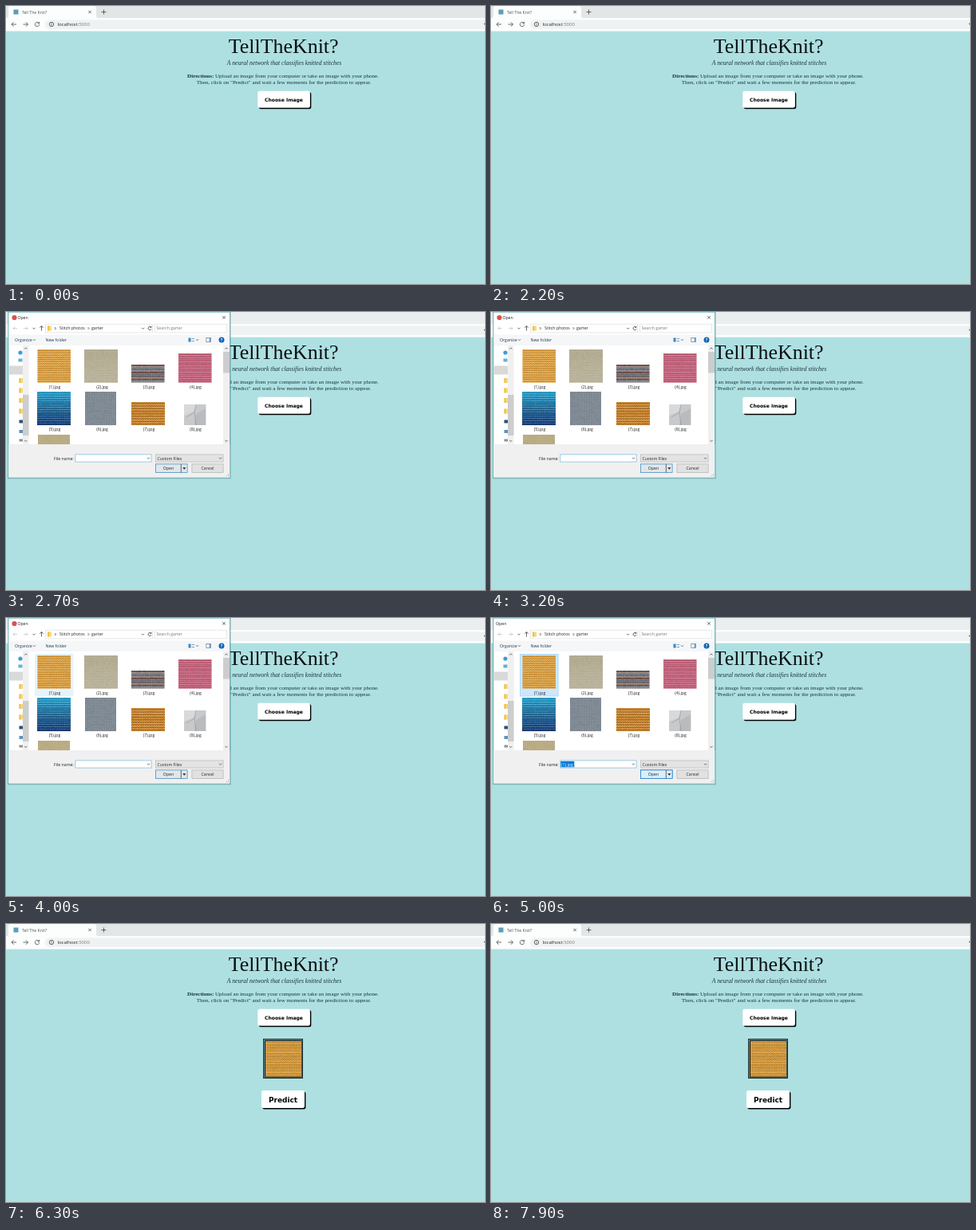
Write an HTML page that moves like this. It is 600 px wide and 349 px high and loops after 8000 ms.

```html
<!DOCTYPE html>
<html lang="en">
<head>
<meta charset="utf-8">
<title>Tell The Knit?</title>
<style>
html, body { margin: 0; width: 100%; height: 100%; overflow: hidden; background: #aee0e2; }
svg { display: block; width: 600px; height: 349px; }
text { font-family: "Open Sans", "Noto Sans", sans-serif; font-size: 5.2px; fill: #222; white-space: pre; }
.serif { font-family: "Liberation Serif", "Noto Serif", serif; font-size: 7.06px; fill: #1a3236; }
.btn { font-family: "DejaVu Sans", sans-serif; font-weight: bold; fill: #000; }
.mid { text-anchor: middle; }
.line { fill: none; stroke: #444; stroke-width: .8; }
</style>
</head>
<body>
<svg id="stage" viewBox="0 0 600 349"></svg>
<script>
const LOOP = 8000;
const stage = document.getElementById('stage');

let seed = 7;
const rand = () => (seed = (seed * 16807) % 2147483647) / 2147483647;

const rect = (x, y, w, h, fill, more = '') =>
  `<rect x="${x}" y="${y}" width="${w}" height="${h}" fill="${fill}" ${more}/>`;
const box = (x, y, w, h, fill, stroke) =>
  rect(x + .4, y + .4, w - .8, h - .8, fill, `stroke="${stroke}" stroke-width=".7"`);
const text = (x, y, s, more = '') => `<text x="${x}" y="${y}" ${more}>${s}</text>`;
const line = (d, more = '') => `<path class="line" d="${d}" ${more}/>`;
const circle = (x, y, r, fill) => `<circle cx="${x}" cy="${y}" r="${r}" fill="${fill}"/>`;
// A group seen only between two times
const timed = (from, to, body) => `<g data-from="${from}" data-to="${to}">${body}</g>`;

// Knitted rows: base colour, dark loops, light glints
function swatch(x, y, w, h, colour, { gap = 2.8, dark = .3, light = .3 } = {}) {
  const n = Math.round(h / gap), p = h / n, step = w / Math.round(w / 3);
  let out = '';
  for (let i = 0; i < n; i++) {
    const top = y + i * p;
    let loops = '', glints = '';
    for (let cx = x; cx < x + w - .1; cx += step) {
      const lift = (rand() - .5) * .5;
      loops += `M${cx.toFixed(2)} ${(top + p * .75).toFixed(2)}q${step / 2} ${(-p * .7 + lift).toFixed(2)} ${step} 0`;
      if (rand() < .65) glints += `M${(cx + step * .25).toFixed(2)} ${(top + p * .2).toFixed(2)}h${(step * .5).toFixed(2)}`;
    }
    out += rect(x, top, w, p + .1, colour(i / (n - 1), i)) +
      `<path d="${loops}" fill="none" stroke="#201000" stroke-opacity="${dark}" stroke-width=".85"/>` +
      `<path d="${glints}" stroke="#fff" stroke-opacity="${light}" stroke-width=".7"/>`;
  }
  return out;
}
const plain = c => () => c;
const blend = (a, b) => k => `rgb(${a.map((v, i) => Math.round(v + (b[i] - v) * k))})`;
const cycle = list => (k, i) => list[i % list.length];
const gold = plain('#e6a743');

function browser() {
  return rect(0, 0, 600, 15, '#e2e6e6') +
    timed(2300, 5300, rect(0, 0, 600, 15, '#eaeeee')) +
    '<path d="M1 15q2 0 2-3V3q0-3 3-3H110q3 0 3 3v9q0 3 2 3z" fill="#fcfdfd"/>' +
    rect(9.5, 4.5, 6, 6, '#5a9db8') +
    text(20, 9.5, 'Tell The Knit?', 'style="font-size:5.15px;fill:#555"') +
    line('M103.3 5.8l3.4 3.4m0-3.4l-3.4 3.4') +
    line('M119.5 7.5h6m-3-3v6') +
    rect(0, 15, 600, 17, '#fcfdfd') +
    rect(49, 17.5, 570, 11.5, '#eff2f2', 'rx="5.7"') +
    line('M13 23h-6m2.6-2.7L7 23l2.6 2.7M21.5 23h6m-2.6-2.7l2.6 2.7-2.6 2.7', 'stroke-width="1"') +
    line('M41 21.2a2.7 2.7 0 1 0 .7 2.2M41.7 19.8v2.2h-2.3') +
    line('M54.3 23a2.7 2.7 0 1 0 5.4 0a2.7 2.7 0 1 0-5.4 0M57 22.6v1.8M57 21.2v.6') +
    text(64.4, 25.3, 'localhost<tspan fill="#777c80">:5000</tspan>', 'style="font-size:6px"') +
    line('M600 22l-1.2.4 1.2.8', 'stroke-width=".5"');
}

const button = (x, y, w, h) =>
  rect(x + 1.4, y + 1.4, w, h, '#000', 'rx="2.2"') + rect(x, y, w, h, '#fff', 'rx="2.2"');

function page() {
  return rect(0, 31.6, 600, 318, '#aee0e2') +
    text(347.7, 59.2, 'TellTheKnit?', 'class="serif mid" style="font-size:25.9px;fill:#0b0f10"') +
    text(348.5, 74, 'A neural network that classifies knitted stitches',
      'class="serif mid" style="font-size:7.6px;font-style:italic"') +
    text(347, 89.6, '<tspan font-weight="bold">Directions:</tspan> Upload an image from your computer or take an image with your phone.',
      'class="serif mid"') +
    text(348, 97.6, 'Then, click on "Predict" and wait a few moments for the prediction to appear.', 'class="serif mid"') +
    button(315.3, 106.8, 65.6, 21) +
    text(348, 120, 'Choose Image', 'class="btn mid" style="font-size:6.06px"') +
    timed(5400, LOOP,
      rect(322, 144, 50, 50, '#1c2c30') + rect(323, 145, 48, 48, '#6d9499') +
      rect(324, 146, 46.5, 46.5, '#10181a') + swatch(325, 147, 45, 44.5, gold) +
      button(320, 209, 54, 22) +
      text(347, 224, 'Predict', 'class="btn mid" style="font-size:8.95px"'));
}

const scrollBar = (x, w, top, thumbY, thumbH) => {
  const c = x + w / 2;
  return rect(x, top, w, 166 - top, '#f0f0f0') + rect(x, thumbY, w, thumbH, '#cdcdcd') +
    line(`M${c - 1.6} 46.5l1.6-1.6 1.6 1.6M${c - 1.6} 161l1.6 1.6 1.6-1.6`);
};
const drop = (x, y) => line(`M${x - 1.5} ${y - .7}l1.5 1.5 1.5-1.5`, 'stroke-width=".6"');
const folder = (x, y) => rect(x, y, 5, 6, '#f6d978') + rect(x, y, 2, 6, '#ecc04e');

function photos() {
  const yarn = ['#665f68', '#a68878', '#556b80', '#9a8f91', '#7a5650', '#6c7683'];
  return swatch(39.5, 47, 41.5, 41.5, gold) +
    swatch(98, 47, 42, 41.5, plain('#bbb59a'), { gap: 2, dark: .16, light: .2 }) +
    swatch(157, 66, 41.5, 22.5, cycle(yarn), { gap: 2.2, dark: .35 }) +
    swatch(216, 52, 41.5, 36.5, plain('#c9637f'), { gap: 2.6, dark: .22, light: .2 }) +
    swatch(39, 100, 42, 42, blend([38, 168, 214], [20, 62, 125]), { light: .22, dark: .35 }) +
    swatch(99, 100, 39, 42, plain('#8794a1'), { gap: 2, dark: .22, light: .2 }) +
    swatch(157, 113, 42, 29, plain('#cf8a32'), { gap: 3.2, dark: .42 }) +
    rect(223, 116, 27.5, 26, '#c8c9cb') +
    '<path d="M223 116h15l-3 9-12 5z" fill="#d8d9da"/><path d="M236 142l2-14 12-7v21z" fill="#b9bbbe"/>' +
    line('M238 116l-2 10-10 6M236 126l2 16', 'stroke-width=".6" opacity=".3"') +
    swatch(40, 154, 40, 12, plain('#c3b58c'), { gap: 2, dark: .16, light: .2 });
}

function labels() {
  return [0, 1, 2, 3, 4, 5, 6, 7].map(i => {
    const x = [61, 120.5, 179, 237.5][i % 4];
    return text(x, i < 4 ? 95.7 : 149.3, `(${i + 1}).jpg`, 'class="mid"');
  }).join('');
}

function sidebar() {
  return circle(18, 51, 2.6, '#3f9bd8') + rect(15.5, 58.5, 5, 4, '#5fb2dd') +
    rect(4, 67.5, 17, 11, '#d9d9d9') +
    [83, 95.5, 108, 121.5].map(y => folder(16.5, y)).join('') +
    rect(16.5, 135.5, 4.5, 4, '#2c4f78') + rect(16.5, 148, 4.5, 4, '#5795c4') +
    rect(16.5, 159.5, 4.5, 3, '#8b9298');
}

function navigation() {
  return line('M14 20.5H9m2-2l-2 2 2 2M22 20.5h5m-2-2l2 2-2 2', 'opacity=".3"') + drop(35, 20.5) +
    line('M44.5 23.5v-6m-2.2 2.2l2.2-2.2 2.2 2.2') +
    box(49, 14.8, 135, 11.5, '#fff', '#dedede') + folder(52, 17.5) +
    line('M61 19l1.5 1.5-1.5 1.5', 'stroke-width=".6"') +
    text(67, 22.3, 'Stitch photos') +
    line('M102.5 19l1.5 1.5-1.5 1.5', 'stroke-width=".6"') +
    text(107, 22.3, 'garter') + drop(171.5, 20.5) +
    line('M181.6 19a2.1 2.1 0 1 0 .5 2.2M182 17.8v1.6h-1.6', 'stroke-width=".7"') +
    box(186, 14.8, 91, 11.5, '#fff', '#dedede') +
    text(188.5, 22.3, 'Search garter', 'style="fill:#777"') +
    rect(4, 28.5, 276, 13.5, '#f5f6f7') +
    text(11, 37, 'Organize', 'style="fill:#1e395b"') + drop(35.5, 35) +
    text(49.5, 37, 'New folder', 'style="fill:#1e395b"') +
    rect(228.5, 32.5, 3, 5, '#3f87bd') + rect(232.5, 33, 3.5, 1, '#6ba3cb') + rect(232.5, 36, 3.5, 1, '#6ba3cb') +
    drop(239.5, 35) +
    box(250.5, 32, 6.5, 6, '#fff', '#58758d') + rect(254.5, 32.5, 2, 5, '#6ba3cb') +
    circle(270, 35, 3.5, '#1065b5') +
    text(270, 36.9, '?', 'class="mid" style="fill:#fff;font-weight:bold"');
}

function controls() {
  return text(60, 185.5, 'File name:') +
    box(86.5, 178.5, 96, 10, '#fff', '#7ab8de') + drop(178.5, 183.5) +
    box(187, 178.5, 85.5, 10, '#e3e3e3', '#b9b9b9') + text(189.5, 185.5, 'Custom Files') + drop(268.5, 183.5) +
    box(187, 190.5, 40.5, 11.5, '#e3e6e8', '#2f87c4') +
    timed(4800, 5300, box(187, 190.5, 40.5, 11.5, '#dcedfa', '#0078d7')) +
    line('M219.3 191v10.5', 'stroke-width=".6"') +
    '<path d="M221.2 195.3h4.2l-2.1 2.4z" fill="#222"/>' +
    text(203.5, 198.4, 'Open', 'class="mid"') +
    box(232.5, 190.5, 40, 11.5, '#e1e1e1', '#b2b2b2') + text(252.5, 198.4, 'Cancel', 'class="mid"') +
    rect(278, 205, 1, 1, '#aaa') + rect(276, 205, 1, 1, '#aaa') + rect(278, 203, 1, 1, '#aaa') +
    timed(4200, 5300, rect(87.3, 179.8, 17, 7.5, '#0078d7') +
      text(88, 185.5, '(1).jpg', 'style="fill:#fff"'));
}

function dialog() {
  const blanks = [[61, 179, 24, 8], [87, 178, 95, 10], [187, 178, 85, 10], [187, 190, 40, 11.5], [232, 190, 40, 11.5]];
  return rect(2, 0, 280, 209.5, '#123', 'opacity=".18"') +
    box(2.5, -.3, 278.5, 208.6, '#fff', '#3fa3a8') +
    timed(2300, 4200, circle(10.5, 7, 3.1, '#d9534a') + text(14.4, 9, 'Open')) +
    timed(4200, 5300, text(6, 9, 'Open')) +
    line('M271.2 5l3.6 3.6m0-3.6l-3.6 3.6', 'stroke-width=".7"') +
    rect(3.3, 166, 277, 41.6, '#f0f0f0') +
    timed(2300, 2500, blanks.map(b => rect(...b, '#fff')).join('')) +
    timed(2500, 5300, navigation() + controls()) +
    timed(2600, 5300, sidebar() +
      timed(3800, 4200, rect(36, 45, 48.5, 53.5, '#e5f3ff')) +
      timed(4200, 5300, box(36, 45, 48.5, 53.5, '#cce8ff', '#99d1ff')) +
      labels()) +
    timed(2700, 5300, photos()) +
    scrollBar(21, 7.5, 42, 104, 51) + scrollBar(272, 8, 42, 50, 26.5);
}

stage.innerHTML = browser() + page() + `<g id="dialog">${dialog()}</g>`;

const pane = document.getElementById('dialog');
const groups = [...stage.querySelectorAll('[data-from]')].map(el =>
  ({ el, from: +el.dataset.from, to: +el.dataset.to }));

// time, opacity, scale; held until the next step
const poses = [
  [0, 0, 1], [2300, .4, .96], [2400, .87, .992], [2500, 1, 1],
  [5200, .5, .97], [5300, 0, 1]
];

function draw(t) {
  for (const g of groups) g.el.style.display = t >= g.from && t < g.to ? '' : 'none';
  const [, alpha, scale] = poses.filter(p => p[0] <= t).pop();
  pane.style.display = alpha ? '' : 'none';
  pane.setAttribute('opacity', alpha);
  pane.setAttribute('transform', `translate(142 104) scale(${scale}) translate(-142 -104)`);
}

const start = performance.now();
function tick() {
  draw((performance.now() - start) % LOOP);
  requestAnimationFrame(tick);
}
draw(0);
requestAnimationFrame(tick);
</script>
</body>
</html>
```
